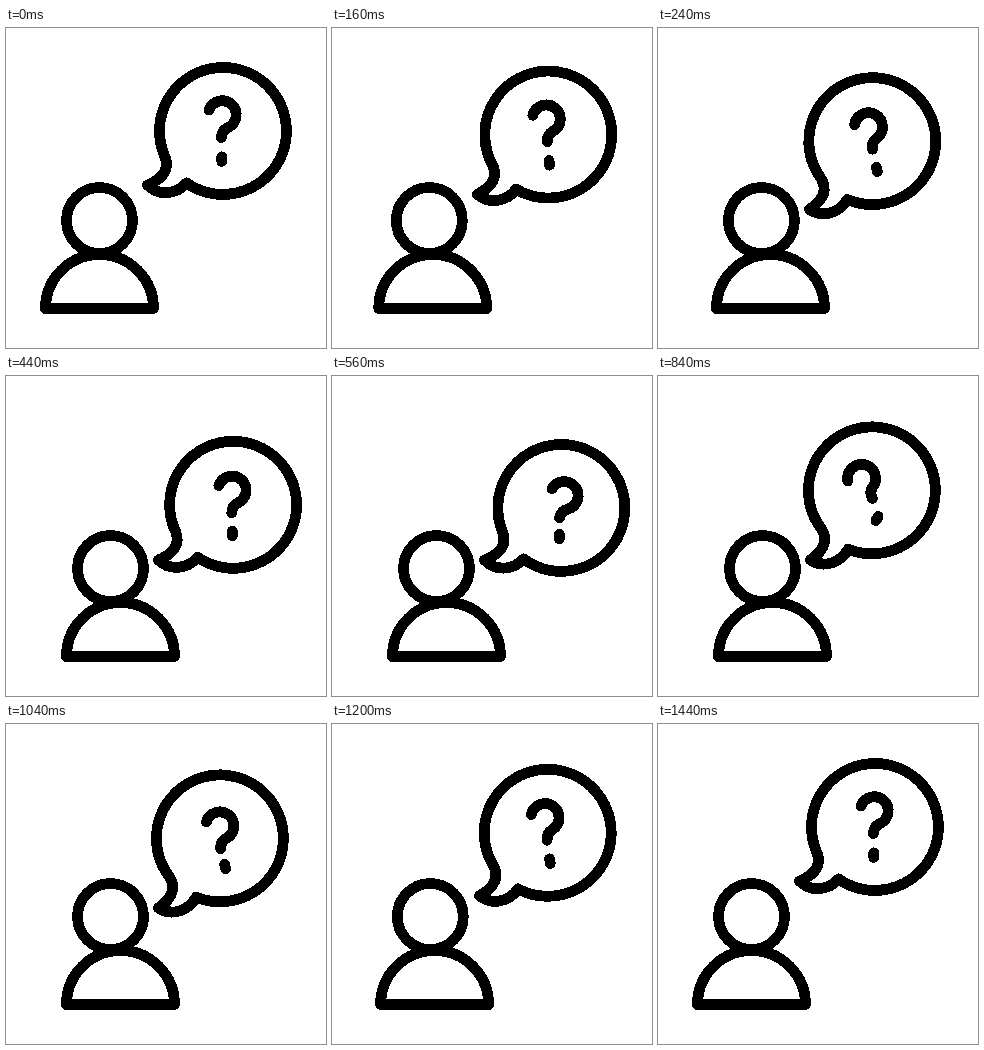
An HTML page that plays this animation: 320x320 px, repeating every 1.48 s.

```html
<!DOCTYPE html>
<html lang="en">
<head>
<meta charset="utf-8">
<title>Person with a question</title>
<style>
  html, body { margin: 0; width: 100%; height: 100%; overflow: hidden; background: #fff; }
  svg { display: block; width: 100vw; height: 100vh; }
  #bubble { transform-origin: 141.5px 157px; }
  #hook { transform-origin: 215.5px 109px; }
  #dot { transform-origin: 215.7px 131px; }
</style>
</head>
<body>
<svg viewBox="0 0 320 320" fill="none" stroke="#000" stroke-width="10.8" stroke-linecap="round" stroke-linejoin="round" shape-rendering="crispEdges">
  <path id="body" d="M39.5 280.5A54 54 0 0 1 147.5 280.5Z"/>
  <circle id="head" cx="93.5" cy="192.5" r="33"/>
  <g id="bubble">
    <path d="M180.6 155A63.5 63.5 0 1 0 159.2 129.3C163 140 159 150 141.5 157C152 168 170 167 180.6 155Z"/>
    <path id="hook" d="M203 82A14 14 0 1 1 222 99.5Q215.5 102.5 215.5 109.5"/>
    <path id="dot" d="M215.7 128.8V133.4"/>
  </g>
</svg>
<script>
const LOOP = 1480, STEP = 40;
const { PI, sin, min, max, floor } = Math;

// Progress from 0 to 1 between two times, linear or eased at both ends.
const part = (t, from, to) => min(1, max(0, (t - from) / (to - from)));
const ease = (t, from, to, bias = 1) => sin(part(t, from, to) ** bias * PI / 2) ** 2;

// Quick move in, slower move back.
const visit = (t, leave) => ease(t, 80, 280) - ease(t, leave, 1440, 0.6);

function place(id, x, y = 0, angle = 0) {
  document.getElementById(id).style.transform =
    `translate(${x}px, ${y}px) rotate(${angle}deg)`;
}

function pose(t) {
  const near = visit(t, 1065);
  const lean = visit(t, 1105);
  const swing = ease(t, 320, 520) - ease(t, 520, 650);
  const u = part(t, 460, 1150);
  const wobble = sin(3 * PI * u) * sin(PI * u);

  place('body', 21 * near);
  place('head', 11 * near);
  place('bubble', 11 * lean, 27 * lean, 18.5 * swing - 13 * lean);
  place('hook', 0, 1.5 * lean + 4.5 * max(0, wobble), 19.5 * wobble);
  place('dot', 0, 0.5 * lean, 50 * max(0, -wobble));
}

const start = performance.now();
function draw() {
  const t = (performance.now() - start) % LOOP;
  pose(floor(t / STEP) * STEP);
  requestAnimationFrame(draw);
}
draw();
</script>
</body>
</html>
```
